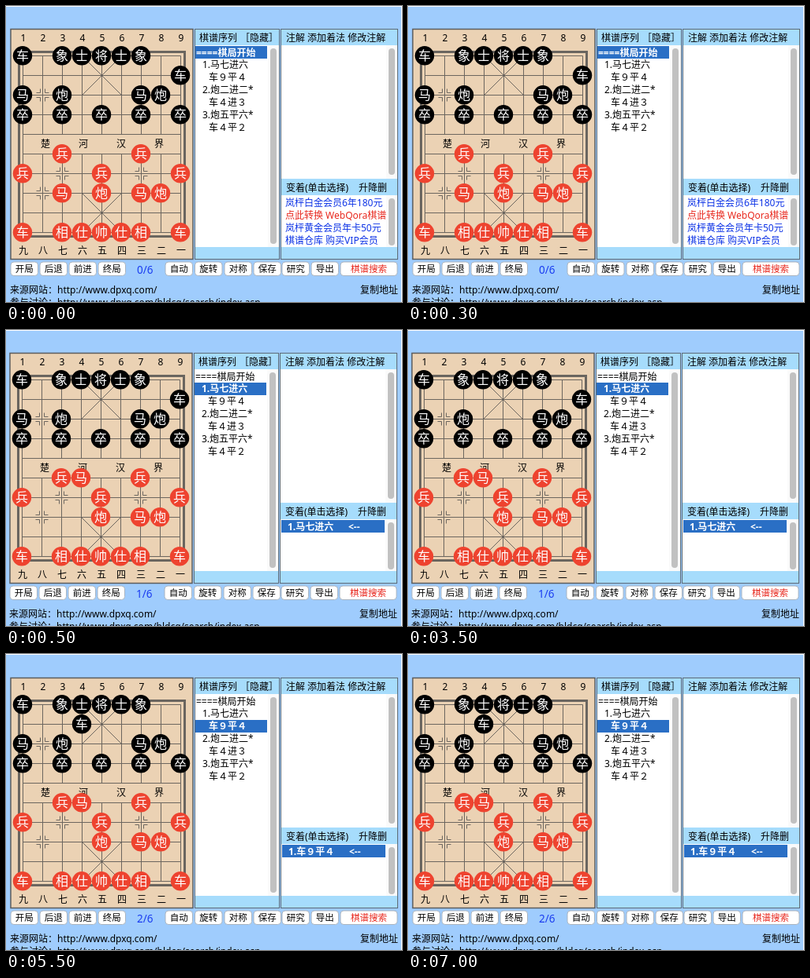
Write an HTML page that moves like this. It is 502x377 px and loops after 8 s.

```html
<!DOCTYPE html>
<html lang="zh-CN">
<head>
<meta charset="utf-8">
<title>象棋打谱</title>
<style>
html, body { margin: 0; width: 100%; height: 100%; overflow: hidden; background: #9fccfd; }
svg { display: block; width: 502px; height: 377px; }
text { font: 12px "Noto Sans", "Noto Sans CJK SC", "Noto Sans CJK", sans-serif; white-space: pre; fill: #000; }
.mid { text-anchor: middle; }
.piece text { font-size: 16px; fill: #fff; }
.button text { font-size: 11.5px; }
.counter text { font-size: 13.5px; fill: #1a3cf0; }
.current text { font-weight: bold; fill: #fff; }
.lines { fill: none; stroke: #6c665f; }

#view, .step, .redHorse, .blackRook { animation: 8s step-end infinite; }
#view { animation-name: nudge; }
.step0 { animation-name: first; }
.step1 { animation-name: second; }
.step2 { animation-name: third; }
.redHorse { animation-name: horse; }
.blackRook { animation-name: rook; }
@keyframes nudge { 0% { transform: none; } 6.25% { transform: translate(-1px, 0); } 68.75% { transform: translate(0, 1px); } }
@keyframes first { 0% { visibility: visible; } 6.25%, 100% { visibility: hidden; } }
@keyframes second { 0% { visibility: hidden; } 6.25% { visibility: visible; } 68.75%, 100% { visibility: hidden; } }
@keyframes third { 0% { visibility: hidden; } 68.75%, 100% { visibility: visible; } }
@keyframes horse { 0% { transform: none; } 6.25%, 100% { transform: translate(25px, -50px); } }
@keyframes rook { 0% { transform: none; } 68.75%, 100% { transform: translate(-125px, 0); } }
</style>
</head>
<body>
<svg viewBox="0 0 502 377">
  <rect width="502" height="377" fill="#9fccfd"/>
  <g id="view"></g>
  <path d="M0 .5H502M501.5 0V377" stroke="#fff"/>
</svg>
<script>
const SVG = 'http://www.w3.org/2000/svg';
const view = document.getElementById('view');
const BLUE = '#0c32e6', RED = '#e8281e', SKY = '#a6dcfc';

function add(tag, attrs, parent = view) {
  const node = document.createElementNS(SVG, tag);
  for (const key in attrs) node.setAttribute(key, attrs[key]);
  parent.append(node);
  return node;
}
const group = (name, parent) => add('g', { class: name }, parent);
const rect = (x, y, width, height, fill, parent, more) =>
  add('rect', { x, y, width, height, fill, ...more }, parent);

// y is the optical middle of the line
function label(text, x, y, parent, { color, mid, size = 12 } = {}) {
  const node = add('text', { x, y: y + size * 0.38 }, parent);
  if (color) node.style.fill = color;
  if (mid) node.classList.add('mid');
  node.textContent = text;
}

const colX = col => 21 + 25 * col;
const rowY = row => 63 + 25 * row;

function drawBoard() {
  rect(6, 29.5, 231, 293, '#ebd2b4', view, { stroke: '#5c5c5c', 'stroke-width': 1.5 });
  rect(16.5, 58.5, 210, 235, 'none', view, { stroke: '#6a655f', 'stroke-width': 3 });
  let d = '';
  for (let row = 0; row < 10; row++) d += `M21 ${rowY(row)}H221`;
  for (let col = 0; col < 9; col++) {
    d += col % 8 ? `M${colX(col)} 63V163M${colX(col)} 188V288` : `M${colX(col)} 63V288`;
  }
  for (const y of [63, 238]) d += `M96 ${y}l50 50M146 ${y}l-50 50`;
  for (const [col, row] of [[1, 2], [2, 6], [6, 6], [1, 7]]) {
    for (const sx of [-1, 1]) for (const sy of [-1, 1]) {
      const x = colX(col), y = rowY(row);
      d += `M${x + 8 * sx} ${y + 3 * sy}H${x + 3 * sx}V${y + 8 * sy}`;
    }
  }
  add('path', { d, class: 'lines', transform: 'translate(.5 .5)' });
  [...'九八七六五四三二一'].forEach((numeral, col) => {
    label(col + 1, colX(col) + 1, 40.5, view, { mid: true });
    label(numeral, colX(col) + 1, 311.5, view, { mid: true });
  });
  [['楚', 50], ['河', 98], ['汉', 146], ['界', 194]].forEach(([text, x]) =>
    label(text, x, 175.5, view, { mid: true }));
}

function drawPiece(text, col, row, name = '') {
  const g = group(`piece ${name}`);
  add('circle', { cx: colX(col), cy: rowY(row) + 0.3, r: 12.2, fill: row < 5 ? '#000' : '#ee432f' }, g);
  label(text, colX(col), rowY(row) + 0.3, g, { mid: true, size: 16 });
}

function drawPieces() {
  const rows = {
    0: '车.象士将士象..', 2: '马.炮...马炮.', 3: '卒.卒.卒.卒.卒',
    5: '..兵...兵..', 6: '兵...兵...兵', 7: '....炮.马炮.', 9: '车.相仕帅仕相.车'
  };
  for (const row in rows) {
    [...rows[row]].forEach((text, col) => text !== '.' && drawPiece(text, col, +row));
  }
  drawPiece('车', 8, 1, 'blackRook');
  drawPiece('马', 2, 7, 'redHorse');
}

function panel(x, width) {
  rect(x, 29.5, width, 293, SKY, view, { stroke: '#5c6a74' });
}
function listBox(x, y, width, height, thumbHeight) {
  rect(x, y, width, height, '#fff');
  rect(x + width - 14, y, 14, height, '#fafafa');
  rect(x + width - 11, y + 4, 8, thumbHeight, '#c1c1c1', view, { rx: 4 });
}

function drawMoves() {
  panel(239.5, 107);
  listBox(240, 50, 106, 257, 249);
  label('棋谱序列', 245, 40);
  label('［隐藏］', 297, 40);
  const moves = [
    ['====棋局开始', 241], ['1.马七进六', 249], ['车９平４', 257], ['2.炮二进二*', 249],
    ['车４进３', 257], ['3.炮五平六*', 249], ['车４平２', 257]
  ];
  moves.forEach(([text, x], i) => {
    const y = 59 + 15.85 * i;
    label(text, x, y);
    if (i > 2) return;
    const mark = group(`step step${i} current`);
    rect(240, Math.round(y - 8), 91, 16, '#2a6fc5', mark);
    label(text, x, y, mark);
  });
}

function drawNotes() {
  panel(348.5, 148);
  listBox(349, 50, 147, 170, 161);
  listBox(349, 241, 147, 66, 60);
  label('注解 添加着法 修改注解', 355, 40);
  label('变着(单击选择)', 355, 231);
  label('升降删', 447, 231);
  const links = group('step step0');
  [['岚枰白金会员6年180元', BLUE], ['点此转换 WebQora棋谱', RED],
   ['岚枰黄金会员年卡50元', BLUE], ['棋谱仓库 购买VIP会员', BLUE]].forEach(([text, color], i) =>
    label(text, 354, 250.5 + 15.85 * i, links, { color }));
  ['1.马七进六', '1.车９平４'].forEach((text, i) => {
    const mark = group(`step step${i + 1} current`);
    rect(350, 242, 131, 16, '#2a6fc5', mark);
    label(text, 358, 250.3, mark);
    label('<--', 435, 250.3, mark);
  });
}

function drawControls() {
  const buttons = [
    ['开局', 6], ['后退', 43], ['前进', 80], ['终局', 117], ['自动', 202], ['旋转', 239.5],
    ['对称', 277], ['保存', 314], ['研究', 350], ['导出', 387], ['棋谱搜索', 424]
  ];
  for (const [text, x] of buttons) {
    const wide = text.length > 2, width = wide ? 72 : 34.5;
    const g = group('button');
    rect(x, 326, width, 17.5, '#fff', g, { rx: 4, stroke: '#a9b4c0' });
    label(text, x + width / 2, 334.5, g, { mid: true, size: 11.5, color: wide ? RED : '#000' });
  }
  for (let i = 0; i < 3; i++) {
    label(`${i}/6`, 166, 335.5, group(`step step${i} counter`), { size: 13.5 });
  }
  label('来源网站：http://www.dpxq.com/', 5, 361.5);
  label('复制地址', 449, 361.5);
  label('参与讨论：http://www.dpxq.com/hldcg/search/index.asp', 5, 377.5);
}

drawBoard();
drawPieces();
drawMoves();
drawNotes();
drawControls();
</script>
</body>
</html>
```
